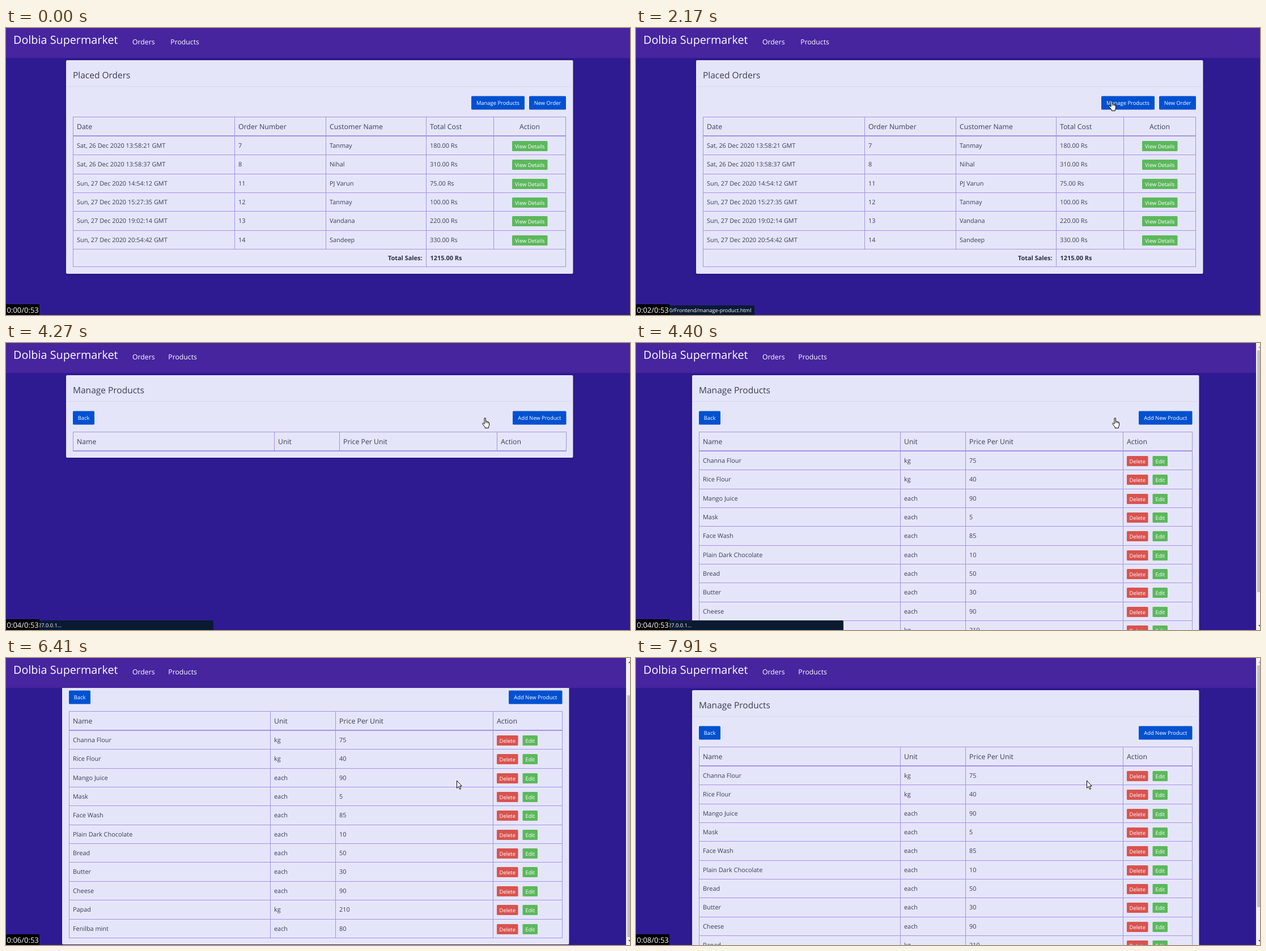
Recreate the animation shown at these times as an HTML page. Size 1101 px wide and 508 px high, loop 8 s.

```html
<!DOCTYPE html>
<html lang="en">
<head>
<meta charset="utf-8">
<title>Orders and products</title>
<style>
html, body { margin: 0; width: 100%; height: 100%; overflow: hidden; background: #2f1b91; }
svg { display: block; width: 1101px; height: 508px; }
text { font-family: "Open Sans", "Noto Sans", sans-serif; font-size: 10.9px; fill: #3a3d50;
  text-rendering: geometricPrecision; white-space: pre; }
.brand { font-size: 19.8px; fill: #fff; }
.nav { font-size: 12.25px; fill: #fff; }
.title { font-size: 15.5px; }
.head { font-size: 12.3px; }
.btn { font-size: 9.4px; fill: #fff; }
.url { font-size: 9.2px; fill: #fff; }
.time { font-size: 13px; fill: #fff; }
.bold { font-weight: 700; fill: #2c2f42; }
.mid { text-anchor: middle; }
.end { text-anchor: end; }
.panel { filter: drop-shadow(0 1px 2px rgba(20, 5, 80, .25)); }
</style>
</head>
<body>
<svg id="stage" viewBox="0 0 1101 508" xmlns="http://www.w3.org/2000/svg"></svg>
<script>
const LOOP = 8000;
const BLUE = '#0051d1', GREEN = '#5cb85c', RED = '#d9534f', LINE = '#a193e5';
const ROW_TOP = 191, PITCH = 33.35;

const rect = (x, y, w, h, fill, extra = '') =>
  `<rect x="${x}" y="${y}" width="${w}" height="${h}" fill="${fill}" ${extra}/>`;
const text = (x, y, str, cls = '') => `<text x="${x}" y="${y}" class="${cls}">${str}</text>`;
const group = (id, body) => `<g id="${id}">${body}</g>`;
const button = (x, y, w, h, fill, str, id = '') =>
  rect(x, y, w, h, fill, `rx="1.5" ${id && `id="${id}"`}`) +
  text(x + w / 2, y + h / 2 + 3.8, str, 'btn mid');
const bigButton = (x, w, str, id) => button(x, 120.5, w, 24, BLUE, str, id);
const rowY = i => Math.round(ROW_TOP + PITCH * i);

function panel(x, bottom, title) {
  return rect(x, 57, 894.5, bottom - 57, '#e5e5fa', 'rx="2" class="panel"') +
    rect(x, 103, 894.5, 1, '#d9d9ee') + text(x + 12, 88.5, title, 'title');
}

function grid(cols, lines, bottom) {
  const left = cols[0], width = cols[cols.length - 1] - left + 1;
  return rect(left, 157, width, 1, LINE) + rect(left, 190, width, 2, LINE) +
    lines.map(y => rect(left, y, width, 1, LINE)).join('') +
    cols.map(x => rect(x, 157, 1, bottom - 157, LINE)).join('');
}

const orders = [
  ['Sat, 26 Dec 2020 13:58:21 GMT', 7, 'Tanmay', 180],
  ['Sat, 26 Dec 2020 13:58:37 GMT', 8, 'Nihal', 310],
  ['Sun, 27 Dec 2020 14:54:12 GMT', 11, 'PJ Varun', 75],
  ['Sun, 27 Dec 2020 15:27:35 GMT', 12, 'Tanmay', 100],
  ['Sun, 27 Dec 2020 19:02:14 GMT', 13, 'Vandana', 220],
  ['Sun, 27 Dec 2020 20:54:42 GMT', 14, 'Sandeep', 330]
];
const products = [
  ['Channa Flour', 'kg', 75], ['Rice Flour', 'kg', 40], ['Mango Juice', 'each', 90],
  ['Mask', 'each', 5], ['Face Wash', 'each', 85], ['Plain Dark Chocolate', 'each', 10],
  ['Bread', 'each', 50], ['Butter', 'each', 30], ['Cheese', 'each', 90],
  ['Papad', 'kg', 210], ['Fenilba mint', 'each', 80]
];

function ordersPage() {
  const cols = [118, 403, 564, 741, 860, 987];
  const at = i => cols[i] + 7;
  const heads = ['Date', 'Order Number', 'Customer Name', 'Total Cost'];
  const rows = orders.map((o, i) => {
    const y = rowY(i);
    const cells = [...o.slice(0, 3), o[3].toFixed(2) + ' Rs'];
    return cells.map((c, k) => text(at(k), y + 20.5, c)).join('') +
      button(893, y + 9, 62.5, 18, GREEN, 'View Details');
  }).join('');
  const total = orders.reduce((sum, o) => sum + o[3], 0).toFixed(2) + ' Rs';
  return panel(106, 435, 'Placed Orders') +
    bigButton(821, 94, 'Manage Products', 'manage') + bigButton(923, 65, 'New Order') +
    grid([118, 741, 987], [...orders.map((_, i) => rowY(i + 1)), 422], 423) +
    [403, 564, 860].map(x => rect(x, 157, 1, rowY(6) - 157, LINE)).join('') +
    heads.map((h, i) => text(at(i), 179, h, 'head')).join('') +
    text(924, 179, 'Action', 'head mid') + rows +
    text(734.5, 411, 'Total Sales:', 'bold end') + text(748.5, 411, total, 'bold');
}

function productsPage(list) {
  const cols = [111, 466, 581, 859, 981];
  const bottom = rowY(list.length);
  const rows = list.map((p, i) => {
    const y = rowY(i);
    return p.map((c, k) => text(cols[k] + 7, y + 20.5, c)).join('') +
      button(866, y + 9, 37.5, 18, RED, 'Delete') + button(911.5, y + 9, 26.5, 18, GREEN, 'Edit');
  }).join('');
  return panel(99, bottom + 12, 'Manage Products') +
    bigButton(111, 38, 'Back') + bigButton(887, 94.5, 'Add New Product') +
    grid(cols, list.map((_, i) => rowY(i + 1)), bottom + 1) +
    ['Name', 'Unit', 'Price Per Unit', 'Action']
      .map((h, i) => text(cols[i] + 7, 179, h, 'head')).join('') + rows;
}

const outline = 'fill="#fff" stroke="#000" stroke-width="1" stroke-linejoin="round"';
const arrow = `<path d="M.5 .5V13.8L3.5 11L5.6 16L7.6 15.1L5.5 10.2H9.2Z" ${outline}/>`;
const hand = `<path d="M4 11.5V2Q4 .5 5.2 .5T6.4 2V6.6Q8.6 5.9 8.8 7.3Q10.6 6.7 10.8 8.2
  Q12.6 7.8 12.6 9.8V13Q12.5 15 11.4 16.4V18.5H5.2V16.8L1 11.6Q.2 10.2 1.4 9.7
  Q2.4 9.5 4 11.5Z" ${outline}/><path d="M6.4 6.6V10M8.8 7.3V10M10.8 8.2V10.4" stroke="#000" stroke-width=".8"/>`;

const statusBar = (w, body) =>
  `<path d="M0 491H${w - 2}Q${w} 491 ${w} 493V508H0Z" fill="#0a1a33"/>` + body;

const stage = document.getElementById('stage');
stage.innerHTML =
  rect(0, 0, 1101, 508, '#2f1b91') +
  group('orders', ordersPage()) +
  group('empty', `<g transform="translate(7 0)">${productsPage([])}</g>`) +
  group('products', productsPage(products)) +
  rect(0, 0, 1101, 53, '#46259f') +
  text(13, 28, 'Dolbia Supermarket', 'brand') + text(223, 29.3, 'Orders', 'nav') +
  `<text id="link" y="29.3" class="nav">Products</text>` +
  group('bar', rect(1094, 0, 7, 508, '#f1f1f1') +
    rect(1096, 0, 5, 428, '#c1c1c1', 'id="thumb"') +
    '<path id="up" d="M1098 9L1101 5.5V9Z"/>' +
    '<path d="M1098 499H1101V502.5Z" fill="#505050"/>') +
  group('url', statusBar(209, text(203.5, 503, '0/Frontend/manage-product.html', 'url end'))) +
  group('wait', statusBar(366, text(98, 503, '127.0.0.1...', 'url end'))) +
  rect(0, 489, 59, 19, '#000') + `<text id="clock" x="1.5" y="504" class="time"></text>` +
  group('arrow', arrow) + group('hand', hand);

const el = {};
stage.querySelectorAll('[id]').forEach(n => el[n.id] = n);

// Each track is a list of [start ms, value...]; values hold until the next step.
const tracks = {
  clock: [[0, 0], [1000, 1], [1920, 2], [2910, 3], [4020, 4], [4900, 5], [5890, 6], [7020, 7], [7910, 8]],
  page: [[0, 'orders'], [4270, 'empty'], [4400, 'products']],
  scroll: [[0, 0], [6040, 18], [6160, 48], [6290, 61], [6410, 63], [7410, 46], [7530, 15], [7650, 2], [7770, 0]],
  url: [[0, 0], [1550, .5], [1650, 1], [4020, 0]],
  wait: [[0, 0], [4020, 1], [4670, .67], [4785, .33], [4900, 0]],
  press: [[0, BLUE], [3030, '#0048bb'], [3150, BLUE]],
  cursor: [[0, ''], [250, 'hand', 943, 311], [650, 'arrow', 884, 238], [770, 'arrow', 846, 184],
    [1000, 'arrow', 819, 135], [1140, 'arrow', 815, 123], [1300, 'hand', 822, 123],
    [1400, 'hand', 825, 123], [1650, 'hand', 824, 123], [2170, 'hand', 834, 128],
    [2280, 'hand', 839, 132], [2430, 'hand', 840, 132], [5400, 'arrow', 844, 132],
    [5540, 'arrow', 822, 172], [5660, 'arrow', 795, 216.5]]
};

const at = (name, t) => tracks[name].filter(s => s[0] <= t).pop().slice(1);
const show = (id, on) => el[id].setAttribute('opacity', +on);
const move = (id, x, y) => el[id].setAttribute('transform', `translate(${x} ${y})`);

function draw(t) {
  const [page] = at('page', t), [scroll] = at('scroll', t);
  ['orders', 'empty', 'products'].forEach(p => show(p, p === page));
  show('bar', page === 'products');
  el.link.setAttribute('x', page === 'orders' ? 290.3 : 286.3);
  move('products', 0, -scroll);
  move('thumb', 0, Math.round(13 + scroll * 53 / 63));
  el.up.setAttribute('fill', scroll ? '#505050' : '#a3a3a3');
  show('url', at('url', t)[0]);
  show('wait', at('wait', t)[0]);
  el.manage.setAttribute('fill', at('press', t)[0]);
  el.clock.textContent = `0:0${at('clock', t)[0]}/0:53`;
  const [kind, x, y] = at('cursor', t);
  ['arrow', 'hand'].forEach(c => show(c, c === kind));
  if (kind) move(kind, x, y);
}

const start = performance.now();
function tick(now) {
  draw(Math.max(0, now - start) % LOOP);
  requestAnimationFrame(tick);
}
draw(0);
requestAnimationFrame(tick);
</script>
</body>
</html>
```
